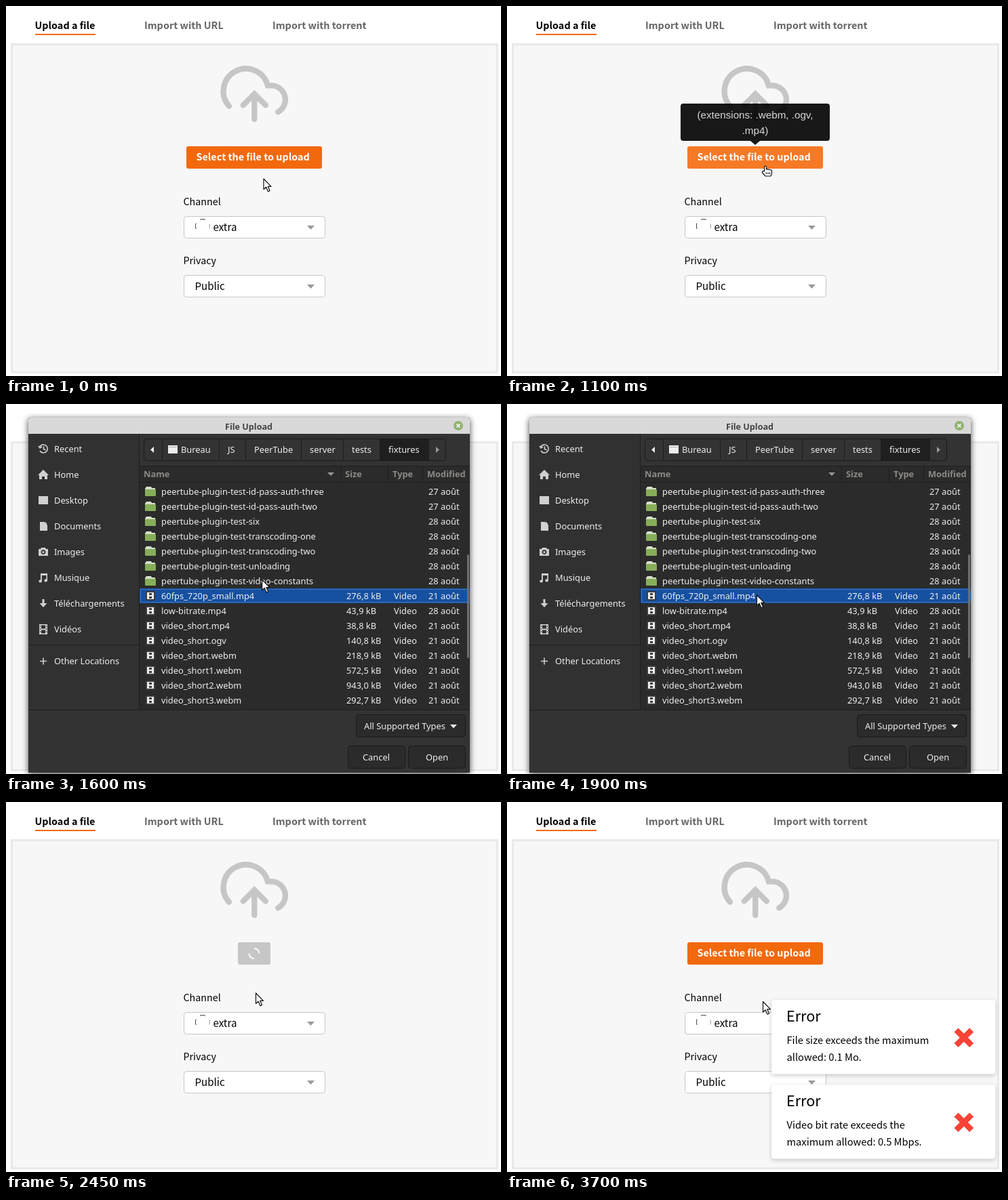
These frames come from a looping animation (730 by 546 pixels, 3750 ms). An HTML page:

```html
<!DOCTYPE html>
<html lang="en">
<head>
<meta charset="utf-8">
<title>Upload a file</title>
<style>
  html, body { margin: 0; width: 100%; height: 100%; overflow: hidden; background: #fff; }
  svg { display: block; }
  text { white-space: pre; }
  .page { font: 14.3px "Noto Sans CJK JP", "Noto Sans CJK SC", "Noto Sans CJK", "Open Sans", sans-serif; }
  .strong { font-weight: 700; font-size: 14.4px; }
  .value { font-size: 15.1px; }
  .title { font-size: 21.6px; font-weight: 500; }
  .message { font-size: 14.7px; }
  .tip { font: 15.2px "Liberation Sans", Arial, sans-serif; fill: #d8d8d8; text-anchor: middle; }
  .toast { filter: drop-shadow(0 2px 3px #0003); }
  #dialog { font: 12.85px "Noto Sans", sans-serif; fill: #eee; }
  #dialog .head { font-weight: 700; fill: #8d8a86; }
  .frame { filter: drop-shadow(0 2px 5px #000b); }
  .box { fill: #2b2b2b; stroke: #1a1a1a; }
  .line { stroke: #1f1f1f; }
  .icon { fill: #d0d0d0; }
  .stroke { fill: none; stroke: #d0d0d0; stroke-width: 1.6; }
</style>
</head>
<body>
<svg width="730" height="546" viewBox="0 0 730 546">
  <g class="page">
    <text class="strong" x="42.5" y="34">Upload a file</text>
    <text class="strong" x="204" y="34" fill="#666">Import with URL</text>
    <text class="strong" x="393" y="34" fill="#666">Import with torrent</text>
    <rect x="43" y="41" width="89" height="2" fill="#f2690d"/>
    <rect x="8.5" y="56.5" width="716" height="484" fill="#f7f7f7" stroke="#e9e9e9" stroke-width="3"/>
    <path transform="translate(316.5 80) scale(4.15)" fill="none" stroke="#c6c6c6" stroke-width="2"
      stroke-linecap="round" d="M16 16l-4-4-4 4M12 12.5v8.5M20.39 18.39A5 5 0 0 0 18 9h-1.26A8 8 0 1 0 3 16.3"/>
    <g id="button">
      <rect x="266" y="207" width="200" height="33" rx="3" fill="#f2690d"/>
      <text class="strong" x="280.5" y="228" fill="#fff">Select the file to upload</text>
    </g>
    <g id="loading">
      <rect x="342" y="207" width="48" height="33" rx="3" fill="#c6c6c6"/>
      <path id="spinner" d="M0 -7.5A7.5 7.5 0 0 1 7.5 0M0 7.5A7.5 7.5 0 0 1 -7.5 0" fill="none" stroke="#fff" stroke-width="2"/>
    </g>
    <text x="261.5" y="294">Channel</text>
    <text x="261.5" y="381">Privacy</text>
    <g id="selects"></g>
    <g fill="none" stroke="#333">
      <path d="M286 315.2q3.7-1.2 8 0M280 320.5q-1.2 4 0 8.5"/>
      <path d="M300 321.5q.8 3.5 0 7" stroke="#999"/>
    </g>
    <text class="value" x="305.5" y="332">extra</text>
    <text class="value" x="278.5" y="419">Public</text>
  </g>
  <g id="tooltip">
    <path d="M260 144h212a4 4 0 0 1 4 4v47a4 4 0 0 1 -4 4h-99l-7 6-7-6h-99a4 4 0 0 1 -4-4v-47a4 4 0 0 1 4-4z" fill="#000" fill-opacity=".9"/>
    <text class="tip" x="366" y="166">(extensions: .webm, .ogv,</text>
    <text class="tip" x="366" y="189">.mp4)</text>
  </g>
  <g id="toasts" class="page"></g>
  <g id="dialog">
    <path class="frame" d="M33 544V23a3 3 0 0 1 3-3h645a3 3 0 0 1 3 3V544z" fill="#333"/>
    <path d="M33 44V23a3 3 0 0 1 3-3h645a3 3 0 0 1 3 3V44z" fill="#d9d9d9"/>
    <text x="358" y="38" text-anchor="middle" font-size="12.6" font-weight="700" fill="#444">File Upload</text>
    <circle cx="667" cy="32" r="7" fill="#92b372"/>
    <path d="M664.5 29.5l5 5m0-5l-5 5" stroke="#fff" stroke-width="1.6"/>
    <rect x="33" y="44" width="163" height="407" fill="#313131"/>
    <rect x="197" y="91" width="487" height="360" fill="#2b2b2b"/>
    <path class="line" d="M196.5 44V451M33 451.5H684M33 355.5H196M197 91.5H684M197 115.5H684M493.5 92v23M563.5 92v23M614.5 92v23"/>
    <g id="places"></g>
    <g fill="none" stroke="#d0d0d0" stroke-width="1.6">
      <path d="M50 63a6 6 0 1 1 0 6M48 62l2 3 3-2M55.5 62.5V66.5l3 1.5"/>
      <path d="M50 379.5h10M55 374.5v10"/>
    </g>
    <g class="icon">
      <path d="M47 105l8-8 8 8h-2v6h-4v-4h-4v4h-4v-6z"/>
      <path d="M48 136h14v12h-14z"/>
      <path d="M50 174h6l5 5v8h-11zM57 173.5l4 4h-4z"/>
      <path fill-rule="evenodd" d="M48 214h3l1-2h6l1 2h3v10h-14zM55 215a3.5 3.5 0 1 0 .1 0zM55 217a1.6 1.6 0 1 1-.1 0z"/>
      <path d="M51 250h10v10.5a2.3 2 0 1 1-1.6-2v-5.5h-6.500v8.500a2.300 2 0 1 1-1.900-2z"/>
      <path d="M53.500 288h3v6h4l-5.500 6-5.500-6h4z"/>
      <path fill-rule="evenodd" d="M49 325h12v15h-12zM52 326.500v5h6v-5zM52 333.500v5h6v-5zM50 327v2h1v-2zM50 331v2h1v-2zM50 335v2h1v-2zM59 327v2h1v-2zM59 331v2h1v-2zM59 335v2h1v-2z"/>
    </g>
    <rect class="box" x="203.500" y="51.500" width="445" height="32" rx="4" style="fill:#333"/>
    <rect x="551" y="52" width="72" height="31" fill="#1f1f1f"/>
    <path class="line" d="M230.500 52v31M314.500 52v31M353.500 52v31M435.500 52v31M497.500 52v31M551.500 52v31M623.500 52v31"/>
    <path d="M218 63v9l-5-4.500z"/>
    <path d="M634 63v9l5-4.500z" fill="#999"/>
    <path d="M239 61h14v12h-14z"/>
    <path d="M240 63.500h12" stroke="#aaa"/>
    <g id="crumbs"></g>
    <path d="M474 101h10l-5 5z" fill="#999"/>
    <g id="files"></g>
    <rect x="680" y="222" width="3" height="153" rx="1.500" fill="#707070"/>
    <rect class="box" x="516.500" y="458.500" width="161" height="33" rx="4"/>
    <rect class="box" x="504.500" y="504.500" width="84" height="33" rx="4"/>
    <rect class="box" x="593.500" y="504.500" width="84" height="33" rx="4"/>
    <text x="528" y="480">All Supported Types</text>
    <path d="M655 473h10l-5 5.500z"/>
    <text x="526" y="526">Cancel</text>
    <text x="619" y="526">Open</text>
  </g>
  <g id="pointer" fill="#fff" stroke="#111" stroke-width="1.200" stroke-linejoin="round">
    <path id="arrow" d="M0 0V15.500L3.600 12.200 6.500 18.700 9 17.600 6.200 11.300H11z"/>
    <path id="hand" d="M-.5 8V1Q.8-1 2.300 1V5Q4 4 5 5.500 6.500 4.500 7.500 6 10.500 5 10.500 8V11L9 15H1L-3.500 10Q-4 7.500-2 7.500zM2.300 12V9.500M5 12V9.500M7.500 12V9.500"/>
  </g>
</svg>
<script>
const LOOP = 3750;
const DIALOG_OPEN = 1200, DIALOG_CLOSE = 2350, UPLOAD_END = 2850, TOAST_START = 2900;
const $ = id => document.getElementById(id);
const clamp = v => Math.min(1, Math.max(0, v));
const text = (x, y, label, cls = '') => `<text class="${cls}" x="${x}" y="${y}">${label}</text>`;

$('selects').innerHTML = [310, 397].map(y => `
  <rect x="262.5" y="${y + .5}" width="208" height="32" rx="4" fill="#fff" stroke="#c6c6c6"/>
  <path d="M444 ${y + 14}h11l-5.5 6z" fill="#999"/>`).join('');

const toast = (y, lines) => `<g class="toast">
  <rect x="390" y="${y}" width="330" height="109.500" rx="4" fill="#fff"/>
  ${text(412, y + 32, 'Error', 'title')}
  ${lines.map((line, i) => text(412.5, y + 65 + 25 * i, line, 'message')).join('')}
  <path d="M662.500 ${y + 44.500}l22.600 22.600m0-22.600l-22.600 22.600" stroke="#f94336" stroke-width="8.500"/></g>`;
$('toasts').innerHTML =
  toast(292, ['File size exceeds the maximum', 'allowed: 0.1 Mo.']) +
  toast(417, ['Video bit rate exceeds the', 'maximum allowed: 0.5 Mbps.']);

$('places').innerHTML =
  ['Recent', 'Home', 'Desktop', 'Documents', 'Images', 'Musique', 'Téléchargements', 'Vidéos']
    .map((name, i) => text(71, 71 + 38 * i, name)).join('') + text(71, 384, 'Other Locations');

$('crumbs').innerHTML =
  [[258, 'Bureau'], [327, 'JS'], [366, 'PeerTube'], [448, 'server'], [510, 'tests'], [564, 'fixtures']]
    .map(([x, name]) => text(x, 72, name)).join('') +
  [[203, 'Name'], [500, 'Size'], [570, 'Type'], [621, 'Modified']]
    .map(([x, name]) => text(x, 108, name, 'head')).join('');

const folders = ['id-pass-auth-three', 'id-pass-auth-two', 'six', 'transcoding-one',
  'transcoding-two', 'unloading', 'video-constants'];
const videos = [['60fps_720p_small.mp4', '276,8'], ['low-bitrate.mp4', '43,9'], ['video_short.mp4', '38,8'],
  ['video_short.ogv', '140,8'], ['video_short.webm', '218,9'], ['video_short1.webm', '572,5'],
  ['video_short2.webm', '943,0'], ['video_short3.webm', '292,7']];

const folderRow = (name, i) => {
  const y = 129 + 22 * i;
  return `<path d="M205 ${y - 4}l2-3h7l1 2h5v11h-15z" fill="#d5dfc8"/>
    <rect x="205" y="${y - 3}" width="16" height="10" rx="1" fill="#87ae59"/>` +
    text(229, y + 5, 'peertube-plugin-test-' + name) + text(623, y + 5, (i < 2 ? 27 : 28) + ' août');
};
const videoRow = ([name, size], i) => {
  const y = 283 + 22 * i;
  const selection = i ? '' : `<rect x="197" y="272" width="487" height="22" fill="#1650a0"/>
    <rect x="198.500" y="273.500" width="484" height="19" fill="none" stroke="#6c9bd8" stroke-dasharray="1 1"/>`;
  return selection + `<rect x="206" y="${y - 7}" width="14" height="14" rx="1" fill="#3d3d3d"/>
    <path fill-rule="evenodd" d="M208 ${y - 5}h10v10h-10zm3 1v3h4v-3zm0 5v3h4v-3z"/>` +
    text(229, y + 5, name) + text(502, y + 5, size + ' kB') + text(572, y + 5, 'Video') +
    text(623, y + 5, (i === 1 ? 28 : 21) + ' août');
};
$('files').innerHTML = folders.map(folderRow).join('') + videos.map(videoRow).join('');

// Pointer stops: time, x, y
const stops = [[0, 380, 255], [200, 380, 255], [500, 380, 236], [1150, 380, 236], [1300, 380, 253.500],
  [1500, 380, 253.500], [1850, 368.500, 282], [2600, 368.500, 282], [2900, 377.500, 294.500], [LOOP, 377.500, 294.500]];

function pointerAt(t) {
  const i = stops.findIndex(stop => stop[0] > t);
  const [t0, x0, y0] = stops[i - 1], [t1, x1, y1] = stops[i];
  const p = (t - t0) / (t1 - t0), k = p * p * (3 - 2 * p);
  return [x0 + (x1 - x0) * k, y0 + (y1 - y0) * k];
}

// Same curve as the CSS ease-out keyword
function easeOut(p) {
  let low = 0, high = 1;
  for (let i = 0; i < 20; i++) {
    const s = (low + high) / 2;
    if (1.74 * s * s * (1 - s) + s ** 3 < p) low = s; else high = s;
  }
  return 3 * low * low - 2 * low ** 3;
}

const show = (id, visible) => $(id).setAttribute('display', visible ? 'inline' : 'none');

function draw(t) {
  const [x, y] = pointerAt(t);
  const hover = y < 241 && t < DIALOG_OPEN;
  const loading = t >= DIALOG_CLOSE && t < UPLOAD_END;
  const rise = easeOut(clamp((t - TOAST_START) / 300));
  show('dialog', t >= DIALOG_OPEN && t < DIALOG_CLOSE);
  show('loading', loading);
  show('button', !loading);
  show('hand', hover);
  show('arrow', !hover);
  show('tooltip', hover);
  show('toasts', t >= TOAST_START);
  $('button').firstElementChild.setAttribute('fill', hover ? '#f67926' : '#f2690d');
  $('tooltip').setAttribute('opacity', clamp((t - 400) / 150));
  $('spinner').setAttribute('transform', `translate(366 223.500) rotate(${(t - 2450) * .3})`);
  $('toasts').setAttribute('transform', `translate(0 ${110 * (1 - rise)})`);
  $('toasts').setAttribute('opacity', rise);
  $('pointer').setAttribute('transform', `translate(${x} ${y})`);
}

function tick() {
  draw(performance.now() % LOOP);
  requestAnimationFrame(tick);
}
tick();
</script>
</body>
</html>
```
